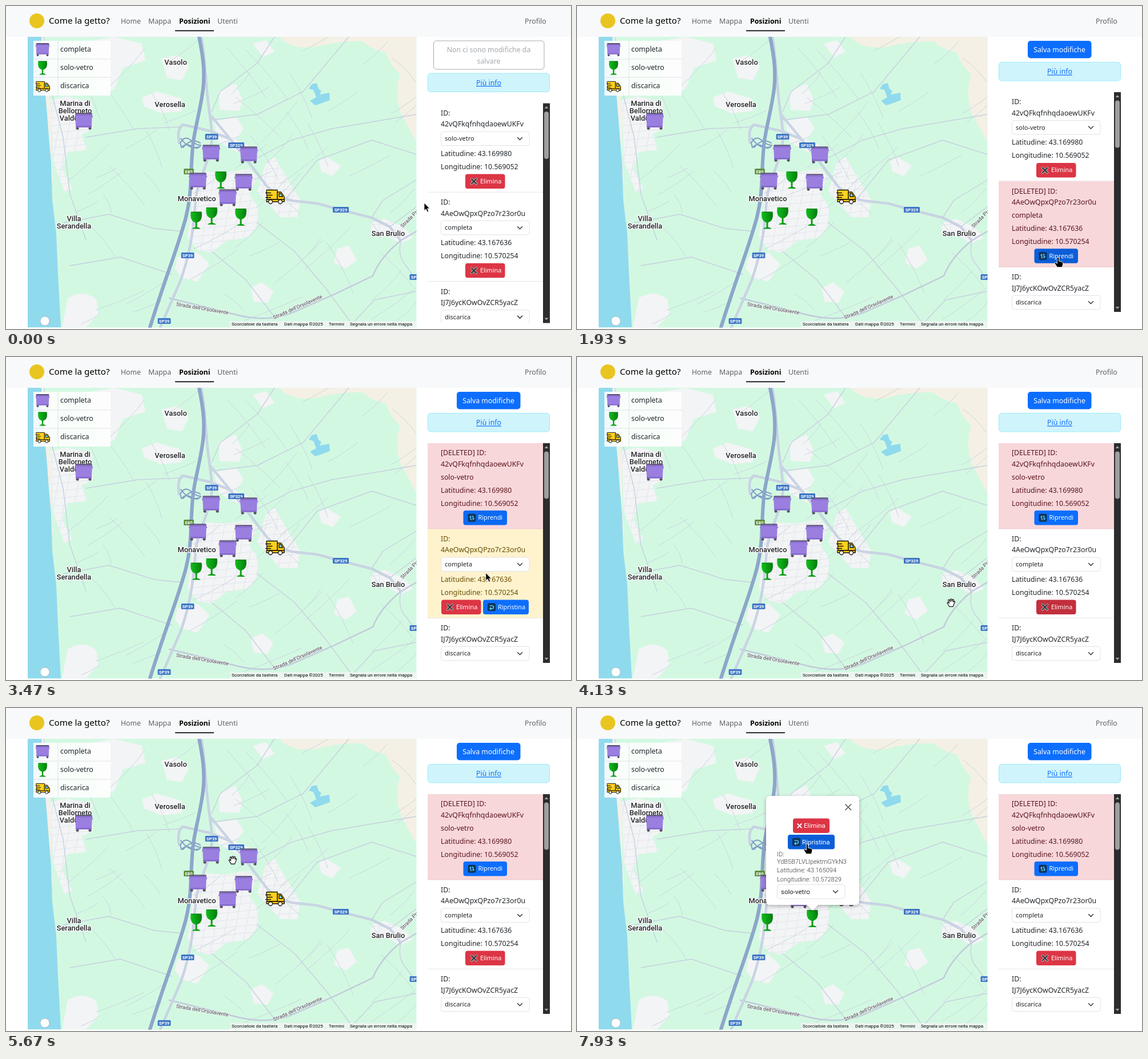
These frames come from a looping animation (989x566 px, 8000 ms). An HTML page:

```html
<!DOCTYPE html>
<html lang="it">
<head>
<meta charset="utf-8">
<title>Posizioni</title>
<style>
html, body { margin: 0; width: 100%; height: 100%; overflow: hidden; background: #fff; }
svg { display: block; width: 989px; height: 566px; }
text { font-family: "Noto Sans", "Open Sans", sans-serif; white-space: pre; }
.mid { text-anchor: middle; }
.rb { font-family: Roboto, sans-serif; }
.place { font-family: Roboto, sans-serif; font-weight: 500; text-anchor: middle;
  paint-order: stroke; stroke: #fff; stroke-width: 2.5px; stroke-linejoin: round; }
.street { font-family: Roboto, sans-serif; paint-order: stroke; stroke: #f6f8fa; stroke-width: 1.6px; }
.line { fill: none; stroke-linecap: round; stroke-linejoin: round; }
</style>
</head>
<body>
<svg viewBox="0 0 989 566">
  <defs>
    <linearGradient id="green"><stop offset="0" stop-color="#13bd1c"/><stop offset=".5" stop-color="#0a9f14"/><stop offset="1" stop-color="#077a10"/></linearGradient>
    <filter id="shadow" x="-20%" y="-20%" width="140%" height="140%"><feDropShadow dx="0" dy="2" stdDeviation="3" flood-opacity=".3"/></filter>
    <clipPath id="mapClip"><path d="M38 54H718.5V563.5H38Z"/></clipPath>
    <clipPath id="listClip"><path d="M738 0H952V385H738Z"/></clipPath>
    <g id="bin">
      <circle cx="-11" cy="12.3" r="2.5" fill="#55525f"/><circle cx="11" cy="12.3" r="2.5" fill="#55525f"/>
      <path d="M-16-9.5h32v2.5h-32z" fill="#8a80b4"/>
      <path d="M-15-12.5h30L13.8 10.5h-27.6z" fill="#9a7fe0"/>
      <path d="M-14 8h28l-.2 2.5h-27.6z" fill="#8468cc"/>
      <path d="M-14-14.8h28l1 2.4h-30z" fill="#5a5470"/>
      <path d="M-15-12.5h30l-.2 2h-29.6z" fill="#8468cc"/>
    </g>
    <g id="glass">
      <path d="M-9.5-15h19q2 14-5 17.5L1.5 4v8q4 .3 6 3h-15q2-2.7 6-3V4L-4.5 2.5Q-11.5-1-9.5-15Z" fill="url(#green)"/>
      <path d="M-9-14.3H9" stroke="#087c10"/>
    </g>
    <g id="truck" stroke="#171300" stroke-width="1.3" stroke-linejoin="round" stroke-linecap="round">
      <path d="M-15-11.5H4V5H-14Z" fill="#ffd21f"/>
      <path d="M4-8H10.5L16 0V8H4Z" fill="#ffc914"/>
      <path d="M7-5.5h3L13.5 0H7Z" fill="#7fdcf2"/>
      <path d="M-15 5H16V9H-15Z" fill="#ffc914"/>
      <path d="M-16.5-6.5h9M-14-2.5h9M-16.5 1.5h9" fill="none"/>
      <circle cx="-8" cy="9" r="3.5" fill="#f2f2f2"/><circle cx="9" cy="9" r="3.5" fill="#f2f2f2"/>
    </g>
    <path id="arrow" d="M0 0V13.5l3.1-2.8 2.2 5 2.4-1-2.2-4.8h4.1Z" stroke="#fff" stroke-width=".8"/>
    <path id="hand" d="M-1.6 1.2Q0-1 1.6 1.2V7l5.6 1.2q2 .8 1.6 4L7.3 17.8H-1.5L-6 10.8q.2-2 2.1-1.3l2.3 1.8Z" stroke="#fff" stroke-width=".9"/>
    <path id="open" d="M-3 6.5l-4-6.5q.3-2 2-.9l1.6 1.9-1.8-6q1-2 2.4 0l1.2 3 .2-4.5q1.2-1.4 2.2 0l.3 4 1.4-3.6q1.6-.8 1.8 1l-.6 4 1.3-2q1.8 0 1.4 1.6l-2.4 5.5-1 2.5z" fill="#fff" stroke="#000" stroke-width="1.1"/>
    <path id="fist" d="M-3 6l-3-5q.3-2.3 2.2-1.6L-4-3.3q1-2.2 2.5-.9Q0-6.3 1.3-4.3 3-5.6 3.8-3.5 6-3.7 5.9-1.2L5 3.3 3.6 6z" fill="#fff" stroke="#000" stroke-width="1.1"/>
  </defs>
  <g id="page"></g>
  <g id="markers" clip-path="url(#mapClip)"></g>
  <g id="overlay"></g>
  <g id="side"></g>
  <use id="cursor"/>
</svg>
<script>
const LOOP = 8000;
const RED = [220, 53, 69], DARK_RED = [187, 45, 59], BLUE = [13, 110, 253], DARK_BLUE = [11, 94, 215], WHITE = [255, 255, 255];
const $ = id => document.getElementById(id);
const clamp = v => Math.min(1, Math.max(0, v));
const mix = (a, b, k) => `rgb(${a.map((v, i) => Math.round(v + (b[i] - v) * k))})`;

const text = (x, y, s, { size = 12.3, cls = '', fill = '#212529', more = '' } = {}) =>
  `<text x="${x}" y="${y + size * .36}" font-size="${size}" class="${cls}" fill="${fill}" ${more}>${s}</text>`;
const box = (x, y, w, h, fill, r = 0, more = '') =>
  `<rect x="${x}" y="${y}" width="${w}" height="${h}" rx="${r}" fill="${fill}" ${more}/>`;
const use = (id, x, y, k = 1) => `<use href="#${id}" transform="translate(${x} ${y}) scale(${k})"/>`;
const line = (d, stroke, width) => `<path class="line" d="${d}" stroke="${stroke}" stroke-width="${width}"/>`;

// ---- map ----
let seed = 39;
const rnd = () => (seed = (seed * 16807) % 2147483647) / 2147483647;

const towns = [
  'M322 300L350 290 385 292 425 285 440 300 426 330 441 352 440 385 424 405 385 412 360 432 336 428 318 405 326 350Z',
  'M78 165L105 158 150 168 152 215 132 225 142 252 108 256 98 285 116 320 103 327 82 270Z',
  'M456 272L470 264 486 292 515 340 510 370 480 370 462 350 440 325 446 305Z',
  'M640 380L662 373 696 387 712 406 690 416 668 403 638 400Z'
];
const patches = [
  'M140 62L190 54 238 66 244 96 205 108 190 145 168 155Z', 'M272 92L300 86 320 106 308 130 282 126Z',
  'M238 160L264 150 306 162 308 184 272 188 242 176Z', 'M372 150L402 136 414 165 408 184 374 182Z',
  'M364 202L403 194 416 215 402 235 425 244 412 260 372 238Z', 'M432 66L455 60 470 80 450 90Z',
  'M548 272L560 264 586 280 572 298 552 290Z', 'M300 440L335 432 356 452 335 483 308 476 296 460Z',
  'M580 425L600 420 614 445 595 460 574 450Z', 'M428 494L448 484 468 500 458 520 434 518Z',
  'M108 512Q135 495 158 514L162 540 140 563H98Z'
];
const lanes = Array.from({ length: 62 }, (_, i) => {
  const a = (i % 3 ? -.62 : .95) + (rnd() - .5) * .5, n = 35 + rnd() * 85;
  const dx = Math.cos(a) * n, dy = Math.sin(a) * n;
  return `M${(100 + rnd() * 600).toFixed()} ${(60 + rnd() * 500).toFixed()}q${(dx * .5 + 6).toFixed()} ${(dy * .5).toFixed()} ${dx.toFixed()} ${dy.toFixed()}`;
}).join('');
const grid = Array.from({ length: 36 }, (_, i) =>
  `M${70 + i * 18} 140l-60 320M70 ${120 + i * 13}l650 -70`).join('');

const motorway = 'M338 54C343 80 349 110 345 145C340 185 330 215 327 245C322 300 326 325 315 370C302 420 281 470 252 563';
const mainRoads = [
  'M342 54C350 100 349 140 356 185L361 225C360 270 336 300 332 340C327 400 323 430 306 480L270 563',
  'M357 190L390 230 425 274 456 315Q472 334 500 341L545 346 585 357 640 371 672 387 691 411',
  'M303 240Q299 213 310 208L357 219 390 232'
];
const roads = [
  'M286 512Q340 525 395 539Q455 556 500 538L575 505 642 473Q655 440 691 411L718 395',
  'M691 411Q685 440 700 455L718 480M600 563L645 515 718 500',
  'M66 54L82 160 100 230 112 330 140 410M140 230L230 215 305 212',
  'M360 185L375 150 440 100 470 54M358 200L440 190 520 150 600 54',
  'M425 274L500 235 570 215 718 190M490 338L545 270 640 235 718 260',
  'M100 380L180 365 260 390 310 395M112 455L200 440 290 470',
  'M440 380L505 430 560 495 610 563M360 430L420 480 470 545',
  'M640 371L660 340 718 305M672 387L718 352'
];

const shield = (x, y, s, fill = '#3d76c5') =>
  box(x - s.length * 2.6 - 1, y - 5, s.length * 5.2 + 2, 10, fill, 1.5) +
  text(x, y, s, { size: 7.6, cls: 'rb mid', fill: '#fff', more: 'font-weight="700"' });
const place = (x, y, s) => text(x, y, s, { size: 12.8, cls: 'place', fill: '#202124' });
const street = (x, y, angle, s) =>
  `<g transform="translate(${x} ${y}) rotate(${angle})">${text(0, 0, s, { size: 9.1, cls: 'street', fill: '#3c4043' })}</g>`;

const mapArt = `<g clip-path="url(#mapClip)">
  ${box(38, 54, 681, 510, '#d3f8e2')}
  <path d="M478 54Q498 76 540 72Q585 60 625 62Q640 77 665 81Q672 103 690 120Q680 150 690 185L718 238V54Z" fill="#f5f0e5"/>
  <path d="M38 54H67L72 120 79 185 79 260 82 310 38 320Z" fill="#f4f1e8"/>
  <path d="M38 54H62L66 120 72 190 75 230 79 275 81 340 88 400 91 470 96 563H38Z" fill="#90daee"/>
  <path d="${towns.join('') + patches.join('')}" fill="#f3f4f5"/>
  <path d="M535 137L544 135 547 145 552 149 549 155 566 152 567 165 548 172 541 174 532 166 543 160 538 147 530 145Z" fill="#90daee"/>
  <clipPath id="townClip"><path d="${towns.join('')}"/></clipPath>
  <g clip-path="url(#townClip)">${line(grid, '#e2e5ed', 1)}</g>
  ${line(lanes, '#c7d5df', 1)}
  ${line(roads.join(''), '#c6d0df', 1.4)}${line(roads[0], '#c1cadb', 2.4)}
  ${line(mainRoads.join(''), '#bcc8db', 4.2)}${line(mainRoads.join(''), '#ccd5e5', 2.8)}
  ${line('M305 240q8-14 18-5t18 9q-6 9-16 2t-18 2zM306 232q14 20 32 15M310 248q14-18 30-8', '#839dc4', 2)}
  ${line(motorway, '#7f99c0', 6)}${line(motorway, '#94accf', 4.2)}${line(motorway, '#849ec4', 1)}
  ${shield(360, 229, 'SP39')}${shield(403, 244, 'SP329')}${shield(586, 357, 'SP329')}
  ${shield(318, 437, 'SP39')}${shield(277, 552, 'SP39')}${shield(718, 475, 'SP39')}${shield(320, 290, 'E80', '#5f8f3e')}
  ${place(297, 98, 'Vasolo')}${place(287, 172, 'Verosella')}
  ${place(121, 170, 'Marina di')}${place(121, 183, 'Bellorneto')}${place(121, 196, 'Valdoreni')}
  ${place(334, 337, 'Monavetico')}${place(119, 372, 'Villa')}${place(119, 385, 'Serandella')}${place(669, 398, 'San Brulio')}
  ${street(298, 522, 9.5, "Strada dell'Orsolavente")}${street(468, 546, -24, "Strada dell'Orsolavente")}${street(692, 387, -46, 'Strada Provinciale')}
  <circle cx="68" cy="552" r="8" fill="#fff" stroke="#9aa0a6" stroke-width=".6"/>
  ${box(392, 552, 327, 12, '#f5f5f5', 0, 'fill-opacity=".75"')}
  ${[[395, 'Scorciatoie da tastiera'], [487, 'Dati mappa ©2025'], [565, 'Termini'], [602, 'Segnala un errore nella mappa']]
    .map(([x, s]) => text(x, 557.5, s, { size: 8.1, cls: 'rb', fill: '#000' })).join('')}
</g>`;

const legend = box(48, 61, 135, 96, '#fff', 0, 'fill-opacity=".87"') +
  line('M48 93H183M48 125H183M91 61V157', '#dee2e6', 1) +
  use('bin', 64, 76.5, .77) + use('glass', 64, 108.5, .8) + use('truck', 64.5, 141, .75) +
  ['completa', 'solo-vetro', 'discarica'].map((s, i) => text(95, 75.5 + 32 * i, s)).join('');

const nav = box(0, 0, 989, 54, '#f8f9fa') + '<circle cx="54" cy="26" r="13" fill="#e9c51f"/>' +
  text(75, 25.5, 'Come la getto?', { size: 15.2, fill: '#000' }) +
  [[201, 'Home'], [249, 'Mappa'], [370, 'Utenti'], [908, 'Profilo']].map(([x, s]) => text(x, 27, s, { fill: '#606162' })).join('') +
  text(303, 27, 'Posizioni', { fill: '#000', more: 'font-weight="700"' }) + box(296, 42.5, 68, 1.7, '#000');

$('page').innerHTML = nav + mapArt;

// ---- controls ----
const icons = {
  cross: (x, y) => `<g transform="translate(${x} ${y})">${line('M-4.2-4.2 4.2 4.2M4.2-4.2-4.2 4.2', '#c9c4c4', 4)}${line('M-4.2-4.2 4.2 4.2M4.2-4.2-4.2 4.2', '#38393c', 2.4)}</g>`,
  times: (x, y) => line(`M${x - 3.2} ${y - 3.2}l6.4 6.4m0-6.4l-6.4 6.4`, '#fff', 2),
  swap: (x, y) => square(x, y) + line(`M${x - 2} ${y + 3}v-6l-1.7 1.8M${x - 2} ${y + 3}h1.5M${x + 2} ${y - 3}v6l1.7-1.8M${x + 2} ${y - 3}h-1.5`, '#5fd0fa', 1.3),
  undo: (x, y) => square(x, y) + line(`M${x - 3} ${y - 2.5}h4q2.6.4 2.6 2.6t-2.6 2.6h-4l1.7-1.7m-1.7 1.7l1.7 1.7`, '#5fd0fa', 1.3)
};
const square = (x, y) => box(x - 6.3, y - 6.3, 12.6, 12.6, '#123c60', 1.5, 'stroke="#0b2238"');

const button = (x, y, w, fill, icon, label, roboto) =>
  box(x, y, w, 25.5, fill, 4) + icons[icon](x + (icon === 'times' ? 11.5 : 15), y + 12.8) +
  text(x + (icon === 'times' ? 19 : roboto ? 25 : 26), y + 12.5, label, { size: roboto ? 11.6 : 10.8, cls: roboto ? 'rb' : '', fill: '#fff' });

const select = (x, y, w, label, roboto) =>
  box(x + .5, y + .5, w - 1, 24.5, '#fff', 4, 'stroke="#dee2e6"') +
  text(x + 7, y + 12.7, label, { size: roboto ? 11.5 : 11, cls: roboto ? 'rb' : '' }) +
  line(`M${x + w - 21} ${y + 11}l4 4 4-4`, '#343a40', 1.5);

// Hover spans fade in and out over 150 ms.
const hover = (t, ...spans) => Math.max(0, ...spans.map(([a, b]) =>
  t < a ? 0 : t < b ? clamp((t - a) / 150) : clamp((b - a) / 150) * (1 - clamp((t - b) / 150))));
const red = k => mix(RED, DARK_RED, k);
const blue = k => mix(BLUE, DARK_BLUE, k);

const entries = [
  { id: '42vQFkqfnhqdaoewUKFv', type: 'solo-vetro', lat: '43.169980', lng: '10.569052' },
  { id: '4AeOwQpxQPzo7r23or0u', type: 'completa', lat: '43.167636', lng: '10.570254' },
  { id: 'IJ7J6ycKOwOvZCR5yacZ', type: 'discarica', lat: '43.165911', lng: '10.574718' }
];
const themes = { normal: ['#fff', '#212529'], deleted: ['#f8d7da', '#58151c'], edited: ['#fff3cd', '#664d03'] };
const height = mode => mode === 'deleted' ? 150.5 : 156.3;

function entry(e, y, mode, fills) {
  const [bg, fill] = themes[mode], gone = mode === 'deleted', low = gone ? -5.7 : 0;
  const row = (dy, s) => text(761, y + dy, s, { fill });
  return box(738, y, 202, height(mode), bg) + box(738, y + height(mode) - 1, 202, 1, gone ? '#e8c3c7' : '#dee2e6') +
    row(17, (gone ? '[DELETED] ' : '') + 'ID:') + row(36.5, e.id) +
    (gone ? row(59.5, e.type) : select(761, y + 49, 155.5, e.type)) +
    row(88 + low, 'Latitudine: ' + e.lat) + row(111 + low, 'Longitudine: ' + e.lng) +
    (gone ? button(800.5, y + 118, 76.5, fills[1], 'swap', 'Riprendi')
      : mode === 'edited' ? button(762, y + 124, 69.5, fills[0], 'cross', 'Elimina') + button(835, y + 124, 80, fills[1], 'undo', 'Ripristina')
      : button(804, y + 124, 69.5, fills[0], 'cross', 'Elimina'));
}

// ---- timeline ----
const DELETE_2 = 870, RESTORE_2 = 2000, DELETE_1 = 3130, RESET_2 = 3800;
const POPUP_A = 4700, POPUP_A_END = 5530, GRAB = 5990, DROP = 6640, POPUP_B = 6900;

function side(t) {
  const dirty = t >= DELETE_2, top = dirty ? 151 : 170.5;
  const modes = [
    t >= DELETE_1 ? 'deleted' : 'normal',
    t < DELETE_2 || t >= RESET_2 ? 'normal' : t < RESTORE_2 ? 'deleted' : 'edited',
    'normal'
  ];
  const fills = [
    [red(hover(t, [2780, DELETE_1])), t < DELETE_1 + 150 ? mix(DARK_RED, DARK_BLUE, clamp((t - DELETE_1) / 150)) : blue(hover(t, [DELETE_1, 3360]))],
    [red(hover(t, [640, DELETE_2], [RESET_2, 4100])),
      t < DELETE_2 + 150 ? mix(DARK_RED, BLUE, clamp((t - DELETE_2) / 150)) : blue(hover(t, [1380, 2450], [3580, RESET_2]))],
    [red(0), blue(0)]
  ];
  let y = 0;
  const list = entries.map((e, i) => {
    const out = entry(e, y, modes[i], fills[i]);
    y += height(modes[i]);
    return out;
  }).join('');
  const save = dirty
    ? box(789, 61, 111.5, 30.5, mix(WHITE, BLUE, clamp((t - DELETE_2) / 150)), 5) + text(844.5, 76.5, 'Salva modifiche', { cls: 'mid', fill: '#fff' })
    : box(748.5, 61, 193.5, 50, '#fff', 5, 'stroke="#a4a9ad"') +
      text(845, 77, 'Non ci sono modifiche da', { cls: 'mid', fill: '#a4a9ad' }) + text(845, 96.5, 'salvare', { cls: 'mid', fill: '#a4a9ad' });
  const info = top - 52.5;
  return save + box(738.5, info, 213, 32.5, '#cff4fc', 5, 'stroke="#9eeaf9"') +
    text(845, info + 16.5, 'Più info', { cls: 'mid', fill: '#0d6efd', more: 'text-decoration="underline"' }) +
    `<g transform="translate(0 ${top})"><g clip-path="url(#listClip)">${list}</g>
      ${box(940, 0, 12, 385, '#2b2c2d')}${box(942, 14.5, 8, 83, '#9f9f9f', 4)}
      <path d="M942.5 9l3.5-4 3.5 4zM942.5 376l3.5 4 3.5-4z" fill="#9f9f9f"/></g>`;
}

const path = [
  [0, 732, 345], [130, 732, 345], [720, 838, 462], [930, 842, 459], [1230, 842, 459], [1530, 843, 442], [1650, 843, 442],
  [1730, 842, 440], [2350, 842, 440], [2900, 832, 287], [3220, 832, 287], [3660, 845, 438], [4060, 845, 438],
  [4130, 655, 431], [4530, 410, 365], [5100, 410, 365], [5430, 408, 236], [5550, 408, 236], [5930, 363, 365],
  [6000, 363, 365], [6450, 415, 366], [6670, 411, 366], [7370, 411, 366], [7880, 403, 238], [8000, 403, 238]
];
const kinds = [
  [0, 'arrow'], [640, 'hand'], [DELETE_2, 'arrow'], [1380, 'hand'], [2450, 'arrow'], [2780, 'hand'], [3360, 'arrow'],
  [3580, 'hand'], [4090, 'open'], [4460, 'hand'], [5180, 'arrow'], [5350, 'hand'], [POPUP_A_END, 'open'], [5860, 'hand'],
  [GRAB, 'fist'], [DROP, 'hand'], [7450, 'arrow'], [7720, 'hand']
];
function pointer(t) {
  const i = path.findIndex(p => p[0] > t), [t0, x0, y0] = path[i - 1], [t1, x1, y1] = path[i];
  const k = clamp((t - t0) / (t1 - t0)), e = k * k * (3 - 2 * k);
  const lift = t0 === 6000 ? 10 * Math.sin(Math.PI * e) : 0;
  return { x: x0 + (x1 - x0) * e, y: y0 + (y1 - y0) * e - lift, kind: kinds.filter(s => s[0] <= t).pop()[1] };
}

const bins = [[136, 202], [359, 258], [425, 261], [336, 307], [416, 309]];
function markers(t, p) {
  const dragging = t >= GRAB && t < DROP;
  const moved = dragging ? [p.x - 3, p.y + 3] : t >= DROP ? [412, 369] : [360, 368];
  return bins.map(b => use('bin', ...b)).join('') +
    (t < DELETE_2 || t >= RESTORE_2 ? use('bin', 388, 336) : '') +
    (t < DELETE_1 ? use('glass', 376, 305) : '') + use('truck', 471, 334) + use('glass', 333, 375.5) +
    (t < POPUP_A_END ? use('glass', 411, 370) : '') +
    (dragging ? line(`M${moved[0] - 5} 383l10 6m0-6l-10 6`, '#333', 1.2) : '') + use('glass', ...moved);
}

function popup(t) {
  const first = t >= POPUP_A && t < POPUP_A_END;
  if (!first && t < POPUP_B) return '';
  const x = first ? 330 : 331, top = first ? 183 : 154, end = first ? 346 : 345;
  const label = (y, s) => text(x + 19, y, s, { size: 11, cls: 'rb', fill: '#333', more: 'font-weight="300"' });
  const [id, lat, lng] = first ? ['T7a2nP906hoA9V0CZbsr', '43.165000', '10.572667'] : ['YdB5B7LVLlpektmGYkN3', '43.165094', '10.572829'];
  return `<path filter="url(#shadow)" fill="#fff" d="M${x + 7} ${top}h149q7 0 7 7V${end - 7}q0 7-7 7H${x + 91}l-9.5 10-9.5-10H${x + 7}q-7 0-7-7V${top + 7}q0-7 7-7Z"/>` +
    line(`M${x + 139} ${top + 15}l9.5 9.5m0-9.5l-9.5 9.5`, '#5a5a5a', 1.7) +
    button(x + 47, top + 39.5, 64, red(first ? hover(t, [5350, POPUP_A_END]) : 0), 'times', 'Elimina', true) +
    (first ? '' : button(x + 38, 222, 82, blue(hover(t, [7720, LOOP])), 'undo', 'Ripristina', true)) +
    label(end - 88.5, 'ID:') + label(end - 76, id) + label(end - 60.5, 'Latitudine: ' + lat) + label(end - 45, 'Longitudine: ' + lng) +
    select(x + 19, end - 36, 119.5, 'solo-vetro', true);
}

const shown = {};
function paint(id, html) {
  if (shown[id] !== html) $(id).innerHTML = shown[id] = html;
}
function draw(now) {
  const t = now % LOOP, p = pointer(t);
  paint('markers', markers(t, p));
  paint('overlay', legend + popup(t));
  paint('side', side(t));
  $('cursor').setAttribute('href', '#' + p.kind);
  $('cursor').setAttribute('transform', `translate(${p.x} ${p.y})`);
}
const start = performance.now();
function tick() {
  draw(performance.now() - start);
  requestAnimationFrame(tick);
}
tick();
</script>
</body>
</html>
```
